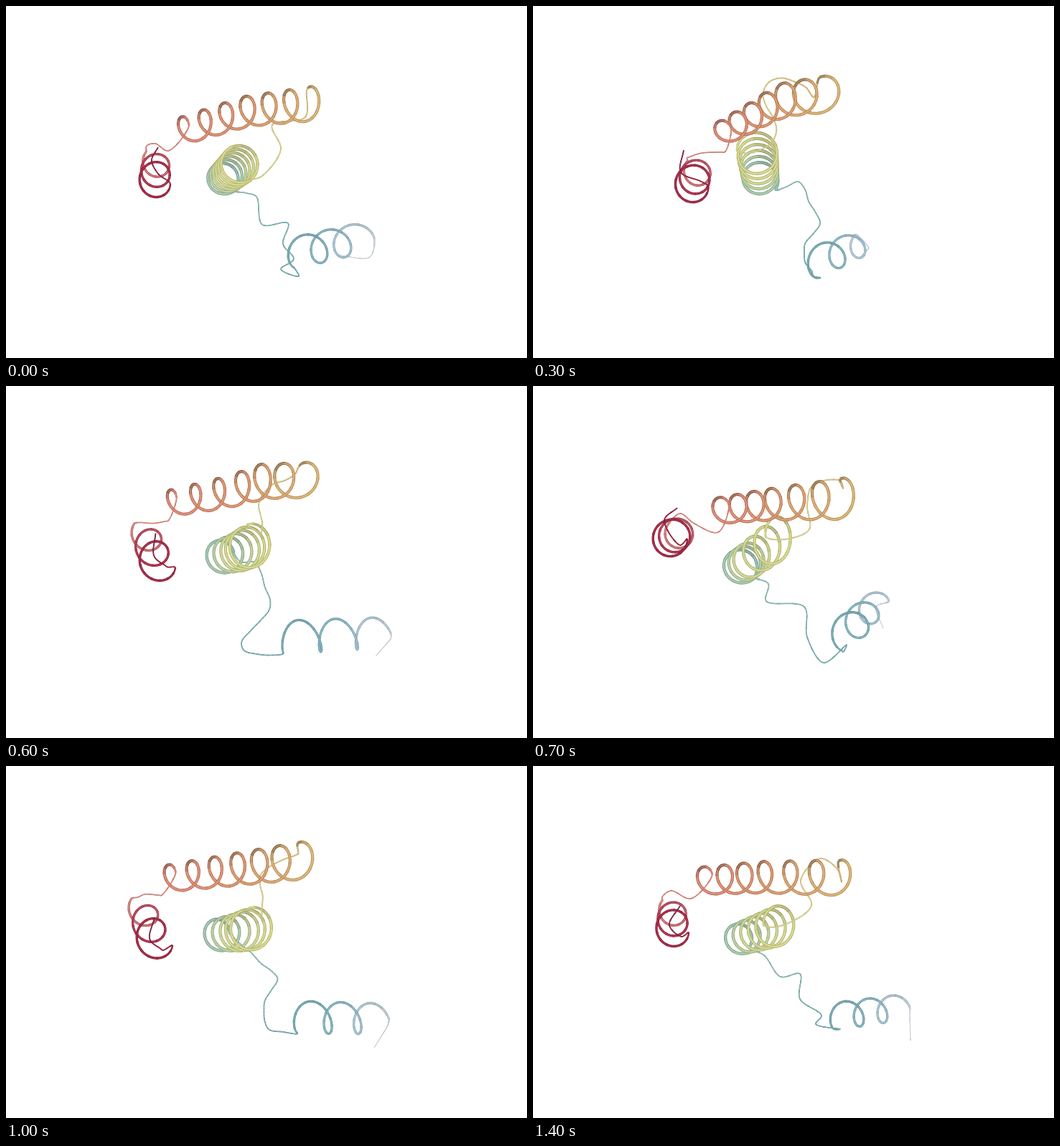
Animation of 726x491 px, one loop 1500 ms. Source, as a matplotlib script:

```python
import numpy as np
import matplotlib.pyplot as plt
from matplotlib.animation import FuncAnimation
from matplotlib.collections import LineCollection
from matplotlib.colors import to_rgb

W, H, DPI = 726, 491, 100
PX = 72 / DPI
NODES = 61  # samples of a helix axis

# Colours at even steps along the chain, from the red end to the lilac end.
HUES = ("#7d1030 #8a1030 #95102f #a81c3c #d67f78 #d97c6c #dc7c69 #d88d60 #d9b268 "
        "#dccf8a #d8d680 #cbd488 #8dbdb2 #74aeb0 #68a4ae #7fb4c2 #bccddb #d5d6e3 "
        "#e3dcea").split()
RGB = np.array([to_rgb(c) for c in HUES])

THIN = [1.7, 1.5, 1.8, 1.6, 1.0]      # loose strands
THICK = [3.3, 4.1, 4.2, 3.2]          # helices
SHADE = [0.05, 0.32, 0.16, 0.08]      # darkening of the far side
LEAN = [0, -8, 0, -8]                 # tilt of the loops
TURN = [(0, 940), (-20, -2265), (180, 2190), (110, 1085)]

POSES = []


def axis(k, vals, turn):
    """Rows of x, y, rx, ry, angle along helix k; a red node is x, y, r."""
    nodes = np.reshape(vals, (-1, 4 if k else 3)).astype(float)
    if k == 0:
        nodes = nodes[:, [0, 1, 2, 2]]
    s = np.linspace(0, len(nodes) - 1, NODES)
    cols = [np.interp(s, np.arange(len(nodes)), c) for c in nodes.T]
    return np.column_stack(cols + [np.linspace(*turn, NODES)])


def add_pose(helices, strands, **turns):
    rows = [axis(k, h, turns.get(name, TURN[k]))
            for k, (name, h) in enumerate(zip("royb", helices))]
    POSES.append((rows, [np.reshape(s, (-1, 2)).astype(float) for s in strands]))


def smooth(pts, n=12):
    """Cubic curve through pts, n samples for each span."""
    gap = np.sqrt(np.hypot(*np.diff(pts, axis=0).T)) + 1e-3
    t = np.r_[0, np.cumsum(gap)]
    slope = np.gradient(pts, t, axis=0)
    u = np.linspace(0, 1, n, endpoint=False)[:, None]
    spans = []
    for i, g in enumerate(gap):
        a, b, ma, mb = pts[i], pts[i + 1], slope[i] * g, slope[i + 1] * g
        spans.append((2*u**3 - 3*u**2 + 1)*a + (u**3 - 2*u**2 + u)*ma
                     + (3*u**2 - 2*u**3)*b + (u**3 - u**2)*mb)
    return np.vstack(spans + [pts[-1:]])


def even(pts, n=12):
    """n points spread evenly over a strand."""
    p = smooth(pts)
    d = np.r_[0, np.cumsum(np.hypot(*np.diff(p, axis=0).T))]
    s = np.linspace(0, d[-1], n)
    return np.column_stack([np.interp(s, d, c) for c in p.T])


def blend(i, j):
    if i == j:
        return POSES[i]
    (ha, sa), (hb, sb) = POSES[i], POSES[j]
    return ([(a + b) / 2 for a, b in zip(ha, hb)],
            [(even(a) + even(b)) / 2 for a, b in zip(sa, sb)])


def coil(rows, lean):
    """Points of a helix and how far each lies at the back."""
    turns = abs(rows[-1, 4] - rows[0, 4]) / 360
    s = np.linspace(0, NODES - 1, int(turns * 52))
    x, y, rx, ry, ang = [np.interp(s, np.arange(NODES), c) for c in rows.T]
    t, a = np.radians(lean), np.radians(ang)
    p, q = rx * np.cos(a), ry * np.sin(a)
    pts = np.column_stack([x + p*np.cos(t) - q*np.sin(t),
                           y + p*np.sin(t) + q*np.cos(t)])
    return pts, np.clip(-np.sin(a), 0, 1) ** 4


def join(before, pts, after, n=12):
    """Strand that leaves one helix and enters the next along their tangents."""
    parts, lo, hi = [pts], 0, None
    if before is not None:
        parts.insert(0, before[[-6, -1]])
        lo = n
    if after is not None:
        parts.append(after[[0, 5]])
        hi = -n
    return smooth(np.vstack(parts), n)[lo:hi]


def chain(helices, strands):
    coils = [coil(h, t) for h, t in zip(helices, LEAN)]
    ends = [None] + [c[0] for c in coils] + [None]
    pts, pos, width, dark = [], [], [], []

    def put(p, start, w, d):
        pts.append(p)
        pos.append(np.linspace(start, start + 1, len(p)))
        width.append(np.full(len(p), w))
        dark.append(d)

    for k, strand in enumerate(strands):
        p = join(ends[k], strand, ends[k + 1])
        put(p, 2 * k, THIN[k], np.zeros(len(p)))
        if k < len(coils):
            p, back = coils[k]
            put(p, 2 * k + 1, THICK[k], back * SHADE[k])
    pos, width, dark = map(np.concatenate, (pos, width, dark))
    width = np.convolve(np.pad(width, 5, mode="edge"), np.ones(11) / 11, "valid")
    rgb = np.column_stack([np.interp(pos * 2, np.arange(len(RGB)), c) for c in RGB.T])
    return np.vstack(pts), rgb * (1 - dark[:, None]), width


def tube(pts, rgb, width, step=4):
    """Short pieces, each a dark edge with a light core, near end last."""
    segs, cols, wids = [], [], []
    for i in range((len(pts) - 2) // step * step, -1, -step):
        piece, c, w = pts[i:i + step + 2], rgb[i], width[i]
        segs += [piece, piece]
        cols += [c * 0.86, c + (1 - c) * 0.16]
        wids += [w * PX, w * 0.5 * PX]
    return segs, cols, wids


# Helix nodes (red, orange, yellow, blue), then the strands between them.
add_pose(
    [[207, 248, 22, 209, 215, 18],
     [243, 175, 14, 19, 335, 147, 17, 21, 429, 136, 16, 24],
     [328, 219, 27, 27, 301, 243, 22, 22],
     [405, 344, 18, 22, 493, 324, 20, 21]],
    [[212, 197, 203, 215, 212, 234],
     [196, 195, 208, 192, 226, 202],
     [419, 118, 417, 155, 371, 166, 383, 200, 357, 237],
     [335, 261, 349, 266, 357, 305, 393, 303, 386, 332, 401, 353, 383, 367, 408, 377],
     [507, 350, 465, 348]], y=(60, 2200))

add_pose(
    [[238, 266, 26, 256, 242, 18],
     [283, 183, 19, 15, 318, 133, 20, 19, 374, 91, 28, 29],
     [284, 190, 33, 25, 342, 240, 24, 24],
     [405, 367, 29, 25, 403, 338, 25, 17]],
    [[212, 219, 209, 252, 245, 259],
     [239, 226, 258, 211, 296, 207],
     [358, 100, 325, 78, 290, 65, 263, 95, 296, 138, 285, 180, 255, 196],
     [380, 247, 408, 242, 437, 292, 408, 325, 442, 365, 426, 382],
     [400, 355, 380, 352]], b=(40, 800))

add_pose(
    [[202, 238, 23, 203, 213, 19],
     [240, 174, 14, 18, 303, 162, 15, 21, 367, 142, 17, 24, 445, 155, 24, 22],
     [340, 213, 23, 29, 293, 249, 24, 23],
     [381, 349, 8, 20, 522, 320, 8, 18]],
    [[208, 183, 202, 213, 220, 229],
     [190, 198, 212, 200, 239, 200],
     [425, 155, 420, 139, 380, 140, 378, 170, 380, 207, 345, 215],
     [325, 258, 343, 249, 342, 285, 368, 312, 324, 367, 355, 371],
     [536, 321, 531, 350]])

add_pose(
    [[189, 213, 26, 205, 204, 20],
     [258, 174, 17, 18, 332, 165, 18, 22, 437, 157, 20, 29],
     [345, 210, 21, 31, 303, 242, 22, 25, 287, 254, 25, 24],
     [435, 346, 22, 24, 480, 301, 16, 16]],
    [[201, 170, 183, 187, 205, 222],
     [205, 178, 225, 192, 258, 204],
     [432, 143, 428, 132, 390, 138, 382, 166, 385, 200, 350, 214],
     [328, 276, 325, 300, 378, 308, 382, 350, 405, 386, 437, 361, 432, 371],
     [478, 308, 488, 338]])

add_pose(
    [[223, 268, 24, 182, 194, 17],
     [212, 154, 13, 18, 323, 133, 16, 23, 397, 107, 23, 27],
     [346, 231, 30, 31, 335, 231, 26, 28, 300, 229, 19, 22],
     [394, 352, 15, 27, 529, 368, 13, 25]],
    [[209, 228, 211, 262, 230, 276],
     [188, 183, 200, 183, 213, 176],
     [385, 83, 389, 124, 328, 140, 325, 158, 366, 195],
     [332, 233, 362, 250, 384, 300, 345, 332, 320, 367, 384, 380],
     [536, 385, 500, 403]], y=(330, 2110))

add_pose(
    [[169, 209, 27, 150, 176, 22],
     [213, 161, 14, 24, 301, 164, 14, 22, 378, 171, 15, 21, 480, 183, 8, 24],
     [394, 236, 24, 30, 305, 245, 23, 25, 238, 256, 14, 18],
     [408, 339, 7, 22, 588, 320, 7, 20]],
    [[199, 162, 181, 187, 188, 208],
     [165, 157, 185, 183, 213, 170],
     [486, 178, 503, 196, 462, 181, 444, 205, 430, 240, 396, 236],
     [262, 275, 285, 279, 318, 305, 340, 302, 348, 368],
     [614, 324, 602, 351]])

add_pose(
    [[194, 232, 23, 194, 199, 18],
     [235, 160, 17, 19, 321, 155, 17, 22, 434, 156, 19, 25],
     [345, 222, 24, 28, 283, 243, 21, 21],
     [422, 349, 14, 19, 511, 337, 14, 18]],
    [[205, 195, 190, 222, 207, 238],
     [180, 183, 192, 174, 220, 185],
     [430, 162, 425, 145, 400, 129, 373, 160, 388, 195, 345, 223],
     [322, 264, 345, 294, 372, 290, 372, 325, 402, 348, 394, 360, 428, 367],
     [525, 345, 526, 383]])

# The two poses averaged at each 100 ms step.
STEPS = [(0, 0), (0, 1), (1, 1), (1, 2), (2, 2), (2, 2), (2, 4), (3, 3),
         (3, 3), (4, 4), (4, 6), (4, 6), (5, 5), (5, 6), (6, 6)]

fig = plt.figure(figsize=(W / DPI, H / DPI), dpi=DPI, facecolor="white")
ax = fig.add_axes([0, 0, 1, 1])
ax.set_xlim(0, W)
ax.set_ylim(H, 0)
ax.axis("off")
lines = LineCollection([], capstyle="butt", joinstyle="round")
ax.add_collection(lines, autolim=False)


def draw(n):
    segs, cols, wids = tube(*chain(*blend(*STEPS[n % len(STEPS)])))
    lines.set_segments(segs)
    lines.set_color(np.clip(cols, 0, 1))
    lines.set_linewidth(wids)
    return [lines]


anim = FuncAnimation(fig, draw, frames=len(STEPS), interval=100,
                     init_func=lambda: draw(0), repeat=True, repeat_delay=0)
plt.show()
```
